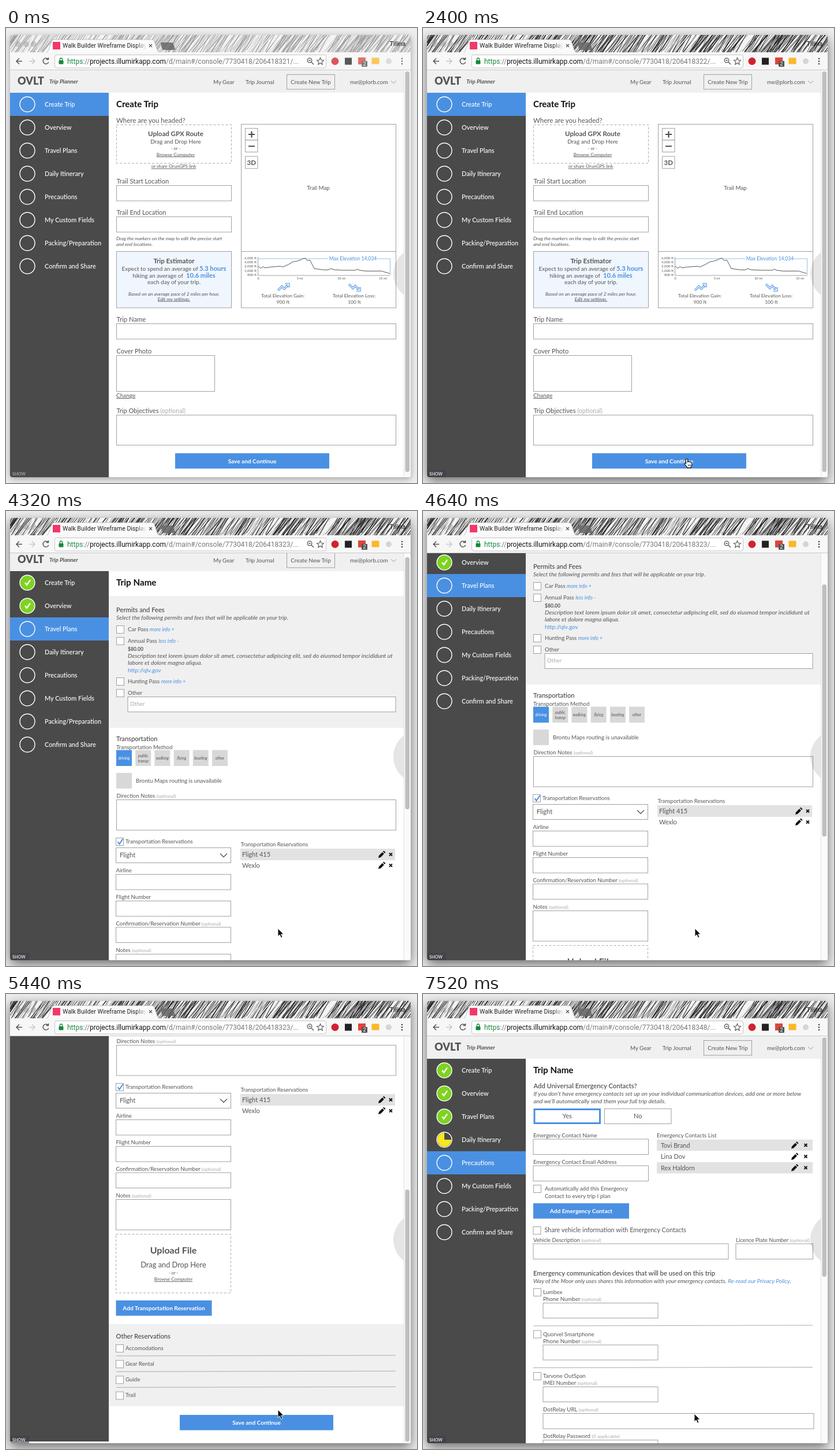
These frames come from a looping animation (712x787 px, 8000 ms). An HTML page:

```html
<!DOCTYPE html>
<html lang="en">
<head>
<meta charset="utf-8">
<title>Trip planner walkthrough</title>
<style>
html, body { margin: 0; width: 100%; height: 100%; overflow: hidden; background: #eee; }
svg { display: block; width: 712px; height: 787px; font-family: Lato, "Open Sans", sans-serif; fill: #555; }
.ui { font-family: Roboto, Inter, sans-serif; }
.box { fill: #fff; stroke: #a0a0a0; }
.clear { fill: none; }
.dash { fill: none; stroke: #aaa; stroke-dasharray: 4 3; }
.line { fill: none; stroke: #777; }
</style>
</head>
<body>
<script>
const BLUE = '#4a90e2', DARK = '#4a4a4a', PALE = '#f0f0f0';
const mid = 'text-anchor="middle"', end = 'text-anchor="end"', bold = 'font-weight="700"', medium = 'font-weight="500" fill="#444"',
  ital = 'font-style="italic"', under = 'text-decoration="underline"',
  blue = `fill="${BLUE}"`, faint = 'fill="#aaa"', white = 'fill="#fff"', black = 'fill="#111"';

const T = (x, y, size, s, ...a) => `<text x="${x}" y="${y}" font-size="${size}" ${a.join(' ')}>${s}</text>`;
const fill = (x, y, w, h, color, a = '') => `<rect x="${x}" y="${y}" width="${w}" height="${h}" fill="${color}" ${a}/>`;
const box = (x, y, w, h, cls = 'box', a = '') => `<rect x="${x}" y="${y}" width="${w}" height="${h}" class="${cls}" ${a}/>`;
const path = (d, color, width = 1, a = '') => `<path d="${d}" fill="none" stroke="${color}" stroke-width="${width}" ${a}/>`;
const dot = (x, y, r, color, stroke = 'none', width = 1) =>
  `<circle cx="${x}" cy="${y}" r="${r}" fill="${color}" stroke="${stroke}" stroke-width="${width}"/>`;
const each = (list, f) => list.map(f).join('');
const opt = (size, s = 'optional') => ` <tspan font-size="${size}" ${faint}>(${s})</tspan>`;
const note = s => ` <tspan font-size="9" ${ital} ${blue}>${s}</tspan>`;

const field = (x, y, w, label, size = 9.7, h = 26.5) => T(x, y - 3.5, size, label) + box(x, y, w, h);
const check = (x, y, label, on, size = 9.6) => box(x + .5, y + .5, 13, 13) + T(x + 20, y + 10, size, label) +
  (on ? path(`M${x + 3} ${y + 7}l3 4 6 -9`, BLUE, 2) : '');
const button = (x, y, w, label) => fill(x, y, w, 26.5, BLUE) + T(x + w / 2, y + 17, 10.1, label, mid, bold, white);
const choice = (x, y, label, on, width = 2) => {
  const inset = on ? (width - 1) / 2 : 0;
  return box(x + inset, y + inset, 115.5 - 2 * inset, 26 - 2 * inset, 'box', on ? `style="stroke:${BLUE};stroke-width:${width}"` : '') +
    T(x + 57.7, y + 16.8, 11.1, label, mid);
};
const chevron = (x, y, r = 6) => path(`M${x - r} ${y - r / 2}l${r} ${r} ${r} ${-r}`, '#555', 1.3);
const tools = (x, y, gap) =>
  `<path d="M${x - 6} ${y + 6}l1 -4 6 -6 3 3 -6 6zM${x + 2} ${y - 5}l1.5 -1.5 3 3 -1.5 1.5z" fill="#111"/>` +
  path(`M${x + gap - 2.5} ${y - 2.5}l5 5m0 -5l-5 5`, '#111', 1.8);
const title = (x, s, size = 15.2) => T(x, 137, size, s, bold, black);

const items = ['Create Trip', 'Overview', 'Travel Plans', 'Daily Itinerary', 'Precautions',
  'My Custom Fields', 'Packing/Preparation', 'Confirm and Share'];

// Header and sidebar shared by every page.
function shell(active, bottom, dx = 0, partial = -1) {
  return `<g transform="translate(${dx} 0)">` + fill(7, 73, 682, 39, PALE) + fill(7, 112, 171, bottom - 112, DARK) +
    T(20, 98, 18, 'OVLT', 'font-weight="900"') + T(75, 96, 9.8, 'Trip Planner', bold, ital) +
    T(359, 96.5, 9.7, 'My Gear') + T(415, 96.5, 9.8, 'Trip Journal') +
    box(486.5, 80.5, 83, 25.5, 'box clear') + T(528, 96.5, 9.8, 'Create New Trip', mid) +
    T(596, 96.5, 10, 'me@plorb.com') + path('M667 91.5l4.5 4 4.5 -4', '#999') +
    fill(7, 112 + 40 * active, 171, 40, BLUE) +
    each(items, (name, i) => {
      const y = 132 + 40 * i, done = i < active && i !== partial;
      return dot(37, y, 13, done ? '#7ed321' : 'none', '#fff', 1.4) +
        (done ? path(`M33 ${y}l3 4 6 -8.5`, '#fff', 2.2) : '') +
        (i === partial ? `<path d="M37 ${y}v-12a12 12 0 1 0 12 12z" fill="#f8e71c"/>` : '') +
        T(67, y + 3.7, 10.9, name, 'font-weight="500"', white);
    }) + '</g>';
}

const profile = 'M0 20l6 5 6 -4 4 3 15 -2 24 -2 6 2 13 -6 12 -7 7 -1 13 -4 5 -3 5 -1 5 6 7 -1 5 10 6 11 ' +
  '22 3h13l5 -3 10 3 22 1h30l4 -3 5 3 16 2h39l20 6';
const chart = (x, y, k) => path(profile, '#555', 1, `transform="translate(${x} ${y}) scale(${k})" vector-effect="non-scaling-stroke"`);
const miles = (x, y, dx) => each(['0', '5 mi', '10 mi', '15 mi'], (s, i) => T(x + i * dx, y, 5.5, s, mid));
const trend = flip => `<g transform="translate(${flip ? 593 : 470} ${flip ? 442 : 455}) scale(1 ${flip ? -1 : 1})">` +
  each([[BLUE, 3.4], ['#fff', 1.3]], ([c, w]) => path('M1 -1l7 -7 4 4 7 -7m-5 -1h6v6', c, w)) + '</g>';

function createTrip() {
  const strong = s => `<tspan font-size="11.2" ${bold} ${blue}>${s}</tspan>`;
  return shell(0, 777) + title(191, 'Create Trip', 15) + T(191, 163.5, 11.5, 'Where are you headed?') +
    box(191.5, 167.5, 199, 66.5, 'dash') + T(294, 187, 11.5, 'Upload GPX Route', mid, bold) +
    T(294, 200, 9.9, 'Drag and Drop Here', mid) + T(294, 210.5, 7.5, '- or -', mid) +
    T(294, 221.5, 8.35, 'Browse Computer', mid, under) + T(290.5, 242, 8, 'or share OrunGPS link', mid, under) +
    field(191.5, 272.5, 199, 'Trail Start Location', 11.1) + field(191.5, 326.5, 199, 'Trail End Location', 11.1) +
    T(191, 367, 8.4, 'Drag the markers on the map to edit the precise start', ital) + T(191, 377, 8.4, 'and end locations.', ital) +
    box(191.5, 386.5, 199, 97.5, 'box', 'style="fill:#f0f6fe"') + T(291, 407, 11.4, 'Trip Estimator', mid, bold) +
    T(291, 420, 10, 'Expect to spend an average of ' + strong('5.3 hours'), mid) +
    T(291, 431.5, 10, 'hiking an average of ' + strong('&#160;10.6 miles'), mid) +
    T(291, 443, 10, 'each day of your trip.', mid) +
    T(291, 463, 8.4, 'Based on an average pace of 2 miles per hour.', mid, ital) + T(291, 471.5, 8.4, 'Edit my settings.', mid, ital, under) +
    box(407.5, 166.5, 268, 317.5) + path('M407 386.5h268', '#a0a0a0') + T(541, 280, 9.8, 'Trail Map', mid) +
    box(414.5, 173.5, 21.5, 20.5) + box(414.5, 194, 21.5, 20.5) + box(414.5, 222, 21.5, 21) +
    path('M420 184h11m-5.5 -5.5v11M420 204.5h11', DARK, 2.2) + T(425.2, 236.5, 11.5, '3D', mid, bold) +
    each(['6,000 ft', '4,000 ft', '2,000 ft', '1,000 ft', '800 ft'], (s, i) => T(434, 399.5 + i * 7.4, 6, s, end)) +
    path('M436.5 396v32h229', '#888', .8) + path('M437 399h121m84 0h23.5v28', '#8ab8ee', .9) +
    T(601, 402, 8.6, 'Max Elevation 14,034', mid, blue) + chart(437, 398, .7) + miles(437, 435, 72) +
    trend(0) + trend(1) + T(479.5, 466, 8.4, 'Total Elevation Gain:', mid) + T(480, 477, 8.4, '900 ft', mid) +
    T(603, 466, 8.4, 'Total Elevation Loss:', mid) + T(603.5, 477, 8.4, '100 ft', mid) +
    field(191.5, 511.5, 484, 'Trip Name', 11.3) + field(191.5, 566.5, 170, 'Cover Photo', 11.1, 62) +
    T(191, 639, 10, 'Change', under) + field(191.5, 669.5, 484, 'Trip Objectives' + opt(10.6), 11.1, 52) +
    button(293, 735.5, 267, 'Save and Continue');
}

function overview() {
  const people = ['Experienced People', 'My Significant Other', 'Guide', 'Pet(s)',
    'Inexperienced People', 'Child(ren)', 'Client(s)', 'Pack Animal(s)'];
  const plans = [['Hiking', 'Tent camping', 'Hammock camping', 'Car camping'], ['Fishing', 'Hunting', 'Geocaching', 'Pack Rafting'],
    ['Photography', 'Yoga/Meditation', 'Stargazing', 'Gear Testing'], ['Snowshoeing', 'Backcountry Skiing', 'Sex', 'Other']];
  return shell(1, 752, 6.5) + title(197.5, 'Trip Name') +
    field(198.5, 165.5, 199, 'Start Date', 10.6) + T(201, 182, 11.1, 'January, 01 2017 - 5:00am') +
    fill(379, 173, 12, 12, '#111') + fill(380.5, 177, 9, 6.5, '#fff') + path('M381.5 171v3m7 -3v3', '#111', 1.5) +
    field(411.5, 165.5, 199, 'End Date', 10.6) + T(414, 182, 11.2, 'Select Approximate Month') + chevron(598, 179) +
    check(198, 195, 'Flexible Start Date') + check(411.5, 195, 'Flexible End Date', 1) +
    T(197.5, 233, 11.3, 'Who’s coming with you?' + opt(9.4), medium) +
    each(people, (s, i) => choice(198 + i % 4 * 122.4, i < 4 ? 237.5 : 270.5, s, [1, 1, 1, 0, 1, 0, 1][i])) +
    fill(184.5, 311, 510.5, 217, PALE) + T(197.5, 332, 11.2, 'Invite Tripmates', medium) +
    field(197.5, 348.5, 199, 'Tripmate Name', 9.8) + field(197.5, 394.5, 199, 'Tripmate Email Address', 9.8) +
    check(197.5, 427, 'Allow this Tripmate to make edits to this', 0, 9.7) + T(217.5, 450, 9.7, 'trip.') +
    check(197.5, 456, 'Automatically add this Tripmate to every', 0, 9.7) + T(217.5, 479, 9.7, 'trip I plan') +
    button(197.5, 488, 166, 'Add Tripmate') + T(411.5, 345, 9.7, 'Tripmate List') +
    each(['Tovi Brand', 'Lina Dov', 'Rex Haldorn'], (s, i) => {
      const y = 368.5 + 39.5 * i, bg = i % 2 ? '#fff' : '#dcdcdc';
      return fill(411.5, y - 19.7, 269.5, 39.5, bg) + dot(434.5, y, 16.5, bg, '#bbb') + T(458, y + 3.5, 11, s) + tools(652, y, 17.5);
    }) +
    T(197.5, 552, 11.2, 'General Itinerary', medium) + T(197.5, 565, 10, 'Receive customized information based on your plans.', ital) +
    each(plans, (col, i) => each(col, (s, j) => check(197.5 + 114.2 * i, 568 + 20 * j, s))) +
    box(560.5, 645, 107, 26) + T(564, 661, 9.4, 'Other', faint) + button(300, 706.5, 266, 'Save and Continue');
}

function travel() {
  const extras = ['Accomodations', 'Gear Rental', 'Guide', 'Trail'];
  return title(191, 'Trip Name') + '<g transform="translate(0 83)">' + fill(178, 72, 511, 228, PALE) +
    T(191, 100, 11.2, 'Permits and Fees', medium) +
    T(191, 113, 10.05, 'Select the following permits and fees that will be applicable on your trip.', ital) +
    check(191, 123, 'Car Pass' + note('more info +')) + check(191, 143, 'Annual Pass' + note('less info -')) + T(211, 166.5, 8.6, '$80.00', bold) +
    T(211, 179, 10.3, 'Description text lorem ipsum dolor sit amet, consectetur adipiscing elit, sed do eiusmod tempor incididunt ut', ital) +
    T(211, 191, 10.3, 'labore et dolore magna aliqua.', ital) + T(211, 204, 10, 'http://qlv.gov', blue) +
    check(191, 213, 'Hunting Pass' + note('more info +')) + check(191, 233, 'Other') + box(211, 246.5, 464, 26) + T(215, 262, 9.7, 'Other', faint) +
    T(191, 323, 11.1, 'Transportation', medium) + T(191, 336.5, 9.6, 'Transportation Method') +
    each(['driving', 'public|transp', 'walking', 'flying', 'boating', 'other'], (s, i) => {
      const x = 191 + 33.2 * i, rows = s.split('|');
      return fill(x, 338.5, 27, 27.5, i ? '#d8d8d8' : BLUE) +
        each(rows, (r, j) => T(x + 13.5, 355 + (j - (rows.length - 1) / 2) * 9, 7, r, mid, ital, i ? '' : white));
    }) +
    fill(191, 378, 27, 27, '#d8d8d8') + T(225, 395, 9.8, 'Brontu Maps routing is unavailable') +
    field(191.5, 424.5, 484, 'Direction Notes' + opt(8.2), 9.6, 52.5) + box(190.5, 490.5, 13, 13) +
    path('M193.5 497l3 4 6 -9', BLUE, 2) + T(207, 500, 9.5, 'Transportation Reservations') +
    box(190.5, 507.5, 199, 26) + T(197, 524, 11, 'Flight') + chevron(377, 520.5) +
    T(406.5, 504.5, 9.5, 'Transportation Reservations') + fill(406, 509, 268, 20, '#e2e2e2') +
    T(409, 523, 11, 'Flight 415') + T(409, 542, 11, 'Wexlo') + tools(651, 519, 15.5) + tools(651, 538, 15.5) +
    field(190.5, 553.5, 199, 'Airline', 9.6) + field(190.5, 599.5, 199, 'Flight Number', 9.6) +
    field(190.5, 645, 199, 'Confirmation/Reservation Number' + opt(8.2), 9.6) + field(190.5, 691.5, 199, 'Notes' + opt(8.2), 9.6, 52.5) +
    box(190.5, 751.5, 199, 101.5, 'dash') + T(290, 785, 16, 'Upload File', mid, bold) + T(290, 808.5, 12.8, 'Drag and Drop Here', mid) +
    T(290, 821, 7.5, '- or -', mid) + T(290, 832, 8.35, 'Browse Computer', mid, under) +
    button(190.5, 866, 166, 'Add Transportation Reservation') +
    fill(178, 907, 511, 142, PALE) + T(190.5, 931.5, 11.1, 'Other Reservations', medium) +
    each(extras, (s, i) => box(190.5, 942.5 + 27.2 * i, 13, 13) + T(207, 951.5 + 27.2 * i, 9.7, s) +
      (i < 3 ? path(`M191 ${962 + 27.2 * i}l484 -1`, '#aaa') : '')) +
    button(301, 1064, 266, 'Save and Continue') + '</g>' + shell(2, 1193);
}

function itinerary() {
  const cell = (x, y, w, h, s) => box(x, y, w, h) + T(x + w / 2, y + h / 2 + 3, 9.6, s, mid);
  return shell(3, 752, 6.5) + title(197.5, 'Trip Name') + T(197.5, 163, 11, 'Daily Itinerary') +
    T(197.5, 176, 9.5, 'Plan before your trip or on the trail', ital) + check(197.5, 179, 'No daily itinerary', 0, 9.7) +
    path('M197.5 219.5h483.5', '#888', 1.3) +
    each([283, 432, 596], (x, i) => dot(x, 219.5, 8, '#fff', i === 1 ? BLUE : '#444', 1.5) +
      T(x, 238.5, 10.8, `Day ${i + 1}`, mid, i === 1 ? bold + blue : '')) +
    path('M278.5 218l4 5.5 8 -13', '#333', 2.6) +
    T(197.5, 262, 10.6, 'Itinerary - Day 2', bold) + T(197.5, 275, 9.3, 'January 02, 2016') + T(681, 268, 9.8, 'Change Trip Dates', end, under) +
    box(198, 285.5, 483, 210) + cell(198, 285.5, 363, 141.5, 'Trail Map') +
    box(198, 427, 363, 68.5, 'box', 'style="fill:#ffe0e3"') + box(229, 437, 325.5, 43, 'line', 'stroke-width=".7"') +
    each([16, 14, 12, 10, 8], (n, i) => T(225, 439 + 10.6 * i, 5.6, n + ',000 ft', end)) + chart(229, 438, 1) + miles(229, 488, 103.5) +
    T(621, 301, 9.8, 'Keep in mind…*', mid) + cell(567.5, 311.5, 107, 72.5, 'Date’s weather') +
    cell(567.5, 384, 53.5, 52.5, 'Sunrise') + cell(621, 384, 53.5, 52.5, 'Sunset') + cell(567.5, 436.5, 107, 53, 'Moon Phase') +
    field(198, 523.5, 483, 'Tonight’s Campsite/Final Destination', 11) + field(198, 577.5, 483, 'Today’s Notes' + opt(10.6), 11, 52) +
    box(198, 637, 165.5, 26, 'box', `style="stroke:${BLUE}"`) + T(280.5, 654, 10.1, 'Previous Day', mid, bold, blue) +
    path('M241 645l-5 5 5 5', BLUE, 1.2) + button(515, 637, 166, 'Next Day') + path('M631 645l5 5 -5 5', '#fff', 1.2) +
    button(306.5, 713, 266, 'Save and Continue');
}

function precautions() {
  const device = (y, name, label) => check(191, y, '') + T(208, y + 10, 9.7, name) + field(208, y + 25.5, 199, label + opt(8.4), 9.7, 26);
  const rule = y => path(`M191 ${y}l484 -1`, '#aaa');
  return shell(4, 777, 0, 3) + title(191, 'Trip Name') +
    T(191.5, 163, 11.3, 'Add Universal Emergency Contacts?', medium) +
    T(191.5, 176, 10.2, 'If you don’t have emergency contacts set up on your individual communication devices, add one or more below', ital) +
    T(191.5, 188.5, 10.2, 'and we’ll automatically send them your full trip details.', ital) +
    choice(192, 198.5, 'Yes', 1, 3) + choice(314.5, 198.5, 'No') +
    field(191, 251, 199.5, 'Emergency Contact Name') + field(191, 297, 199.5, 'Emergency Contact Email Address') +
    T(405, 247.5, 9.6, 'Emergency Contacts List') +
    each(['Tovi Brand', 'Lina Dov', 'Rex Haldorn'], (s, i) => {
      const y = 261.5 + 19.5 * i;
      return fill(405, y - 9.7, 270, 19.5, i % 2 ? '#fff' : '#e2e2e2') + T(412, y + 4, 10.9, s) + tools(644, y, 19);
    }) +
    check(191, 330, 'Automatically add this Emergency', 0, 9.7) + T(211, 352.5, 9.7, 'Contact to every trip I plan') +
    button(191, 362, 166, 'Add Emergency Contact') + check(190.5, 402, 'Share vehicle information with Emergency Contacts', 0, 10.9) +
    field(191, 432, 338, 'Vehicle Description' + opt(8.4), 9.5) + field(542, 432, 133.5, 'Licence Plate Number' + opt(8.4), 9.5) +
    T(191, 487, 11.3, 'Emergency communication devices that will be used on this trip', medium) +
    T(191, 499.5, 10, `Way of the Moor only uses shares this information with your emergency contacts. <tspan ${blue}>Re-read our Privacy Policy</tspan>.`, ital) +
    device(509, 'Lumbex', 'Phone Number') + rule(574) + device(581.5, 'Quorvel Smartphone', 'Phone Number') + rule(646.5) +
    device(654, 'Tarvone OutSpan', 'IMEI Number') + field(208, 725.5, 469, 'DotRelay URL' + opt(8.4)) +
    field(208, 771.5, 199, 'DotRelay Password' + opt(8.4, 'if applicable'));
}

let seed = 7;
const rnd = (low, high) => +(low + (high - low) * (seed = seed * 16807 % 2147483647) / 2147483647).toFixed(2);
const hatch = each([...Array(720)], () =>
  path(`M${rnd(-30, 700)} ${rnd(38, 60)}l${rnd(26, 48)} -52`, rnd(0, 1) < .25 ? '#fff' : '#1a1a1a', rnd(.3, 1.1)));

const chrome = `<g clip-path="url(#bar)">${fill(7, 12, 694, 30, '#f2f2f2')}<g id="hatch">${hatch}</g><g opacity=".45">` +
  each([21, 35, 48], x => dot(x, 28, 5, '#999')) + '</g></g>' +
  '<path d="M268 25h18q3 0 4 3l3 8q0 2 -3 2h-16q-3 0 -4 -3z" fill="#666" opacity=".85"/>' +
  '<path d="M68 43q5 -1 6 -5l5 -15q1 -3 5 -3h168q4 0 5 3l5 15q1 4 6 5z" fill="#fafafa" stroke="#aaa" stroke-width=".7"/>' +
  fill(7, 42, 694, 31, '#f7f7f7') + path('M7 72.5h694', '#c8c8c8') + fill(81, 24, 13, 13, '#f2386a') +
  `<g class="ui">${T(98, 34, 10.5, 'Walk Builder Wireframe Display', 'fill="#222"')}${fill(226, 22, 17, 17, 'url(#fade)')}` +
  T(692, 31, 10.2, 'Tillina', end, black) + box(84.5, 46.5, 470, 22.5, 'box', 'rx="3" style="stroke:#c4c4c4"') +
  T(106, 62, 12, '<tspan fill="#16873c">https</tspan>://<tspan fill="#111">projects.illumirkapp.com</tspan>/d/main#/console/7730418/<tspan id="url"></tspan>/...', 'fill="#777"') + '</g>' +
  path('M248 28l5 5m0 -5l-5 5', '#555', 1.2) + path('M28 57.5h-10m5 -5l-5 5 5 5', '#555', 1.5) + path('M40 57.5h10m-5 -5l5 5 -5 5', '#c8c8c8', 1.5) +
  path('M73 54a5 5 0 1 0 .8 5m-.3 -8v3.5h-4', '#555', 1.5) + fill(91.5, 56, 8, 6.5, '#16873c', 'rx="1"') + path('M93.5 56v-2a2 2 0 0 1 4 0v2', '#16873c', 1.4) +
  dot(526, 56, 3.8, 'none', '#555', 1.3) + path('M529 59l4 4M524.3 56h3.5', '#555', 1.4) +
  path('M544.5 51.5l1.7 4 4.3 .4 -3.3 2.8 1 4.3 -3.7 -2.3 -3.7 2.3 1 -4.3 -3.3 -2.8 4.3 -.4z', '#555', 1.1) +
  `<g id="icons">${dot(570, 57.5, 6.5, '#d0222f')}${fill(587, 51.5, 12, 12, '#222')}${fill(610, 51, 13, 12, '#e0443c')}` +
  fill(616, 57, 10, 10, '#555', 'rx="1"') + T(621, 65, 8.5, '2', mid, white) + fill(633.5, 51.5, 13, 11, '#fbb829') + dot(663, 57.5, 5, '#d5d5d5') +
  each([53, 57.5, 62], y => dot(686, y, 1.3, '#444')) + '</g>';

const pages = [createTrip, overview, travel, itinerary, precautions];
document.body.innerHTML = `<svg viewBox="0 0 712 787"><defs>
<clipPath id="bar"><path d="M7 42v-26q0 -4 4 -4h686q4 0 4 4v26z"/></clipPath>
<clipPath id="view"><path d="M7 73h694v700q0 4 -4 4h-686q-4 0 -4 -4z"/></clipPath>
<linearGradient id="fade"><stop stop-color="#fafafa" stop-opacity="0"/><stop offset="1" stop-color="#fafafa"/></linearGradient></defs>
${fill(0, 0, 712, 787, '#eee')}${fill(7, 12, 694, 765, '#fff', 'rx="4" id="win"')}${chrome}
<g clip-path="url(#view)">${fill(7, 73, 694, 704, '#fff')}<g id="left">${dot(-21, 425, 46, 'rgba(0,0,0,.1)')}</g>
${each(pages, (f, i) => `<g id="page${i}">${f()}</g>`)}
<g id="right">${dot(717, 425, 46, 'rgba(0,0,0,.1)')}</g>
<g id="track">${fill(689, 73, 12, 704, '#fafafa')}${path('M689.5 73v704', '#e2e2e2')}<rect id="thumb" x="691.5" width="7.5" rx="3.7" fill="#bfbfbf"/></g>
${fill(8, 764.5, 32, 12.5, 'rgba(60,64,74,.6)', 'id="badge"')}${T(11, 773.5, 7.2, 'SHOW', bold, 'fill="#ddd"', 'id="show"')}</g>
<g id="arrow"><path d="M0 0v14l3.2 -3 2.3 5.2 2.5 -1.1 -2.3 -5h4.3z" fill="#111" stroke="#fff" stroke-width=".9"/></g>
<g id="hand"><path d="M-1.5 1q1.5 -2 3 0v5l1 -1q1.5 -.8 2 .6 1.7 -.8 2.2 .6 1.9 -.4 2 1.4v3q0 2 -1.5 4v1h-6.7v-1l-4.5 -5.5q-.5 -2 1.5 -1.6l1 1z" fill="#fff" stroke="#111" stroke-width="1.1"/><path d="M2.5 10v3m2 -3v3m2 -3v3" stroke="#111" stroke-width=".8"/></g></svg>`;

const el = id => document.getElementById(id);
const show = (id, on) => el(id).style.display = on ? '' : 'none';
const codes = ['206418321', '206418322', '206418323', '206418325', '206418348'];
const thumbs = [693, 0, 436, 0, 414];

// Each entry changes only the listed parts of the state.
const script = [
  [0, { page: 0, url: 0, scroll: 0, active: false, x: -99, y: -99, hand: false }],
  [320, { x: 655, y: 690 }], [480, { x: 560, y: 728 }], [640, { x: 485, y: 743, hand: true }], [800, { x: 457, y: 745 }],
  [1440, { active: true }],
  [2400, { url: 1 }], [2560, { page: 1, hand: false }],
  [3040, { x: 463, y: 736 }], [3200, { x: 470, y: 720, hand: true }], [3360, { x: 472, y: 714 }],
  [3840, { url: 2 }], [4000, { page: 2, hand: false, x: 471, y: 722 }],
  [4320, { scroll: 8 }], [4480, { scroll: 38 }], [4640, { scroll: 83 }], [4800, { scroll: 240 }], [4960, { scroll: 370 }],
  [5440, { scroll: 419, y: 719 }], [5760, { x: 470, y: 734, hand: true }],
  [5920, { url: 3 }], [6080, { page: 3, scroll: 0 }],
  [6880, { y: 730 }], [7040, { y: 726 }],
  [7520, { page: 4, url: 4, hand: false }]
];

function draw(now) {
  const t = now % 8000, s = {};
  for (const [at, change] of script) if (at <= t) Object.assign(s, change);
  const long = thumbs[s.page] > 0;
  pages.forEach((_, i) => show('page' + i, i === s.page));
  el('page' + s.page).setAttribute('transform', `translate(0 ${-s.scroll})`);
  show('left', !long);
  show('track', long);
  el('right').setAttribute('transform', `translate(${long ? 0 : 12} 0)`);
  el('thumb').setAttribute('height', thumbs[s.page]);
  el('thumb').setAttribute('y', 75 + s.scroll * .628);
  el('url').textContent = codes[s.url];
  el('hatch').style.opacity = s.active ? 1 : .42;
  el('icons').style.opacity = s.active ? 1 : .75;
  el('win').style.filter = s.active ? 'drop-shadow(0 7px 10px rgba(0,0,0,.55))' : 'drop-shadow(0 3px 6px rgba(0,0,0,.32))';
  show('badge', s.active);
  el('show').style.opacity = s.active ? 1 : .6;
  for (const id of ['arrow', 'hand']) {
    show(id, (id === 'hand') === s.hand);
    el(id).setAttribute('transform', `translate(${s.x} ${s.y})`);
  }
  requestAnimationFrame(draw);
}
requestAnimationFrame(draw);
</script>
</body>
</html>
```
